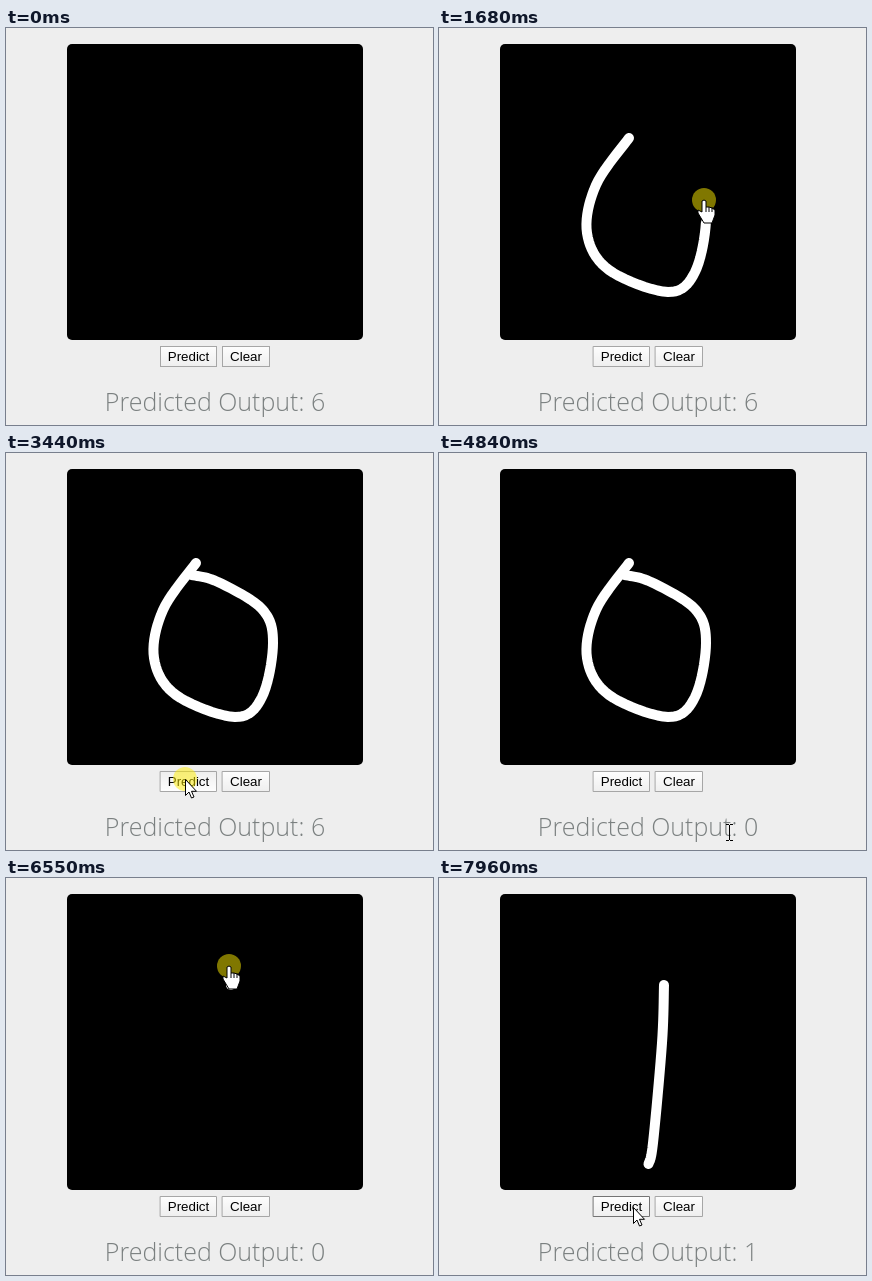
Animation of 427x397 px, one loop 8000 ms. Source, as an HTML page with a canvas:

```html
<!DOCTYPE html>
<html lang="en">
<head>
<meta charset="utf-8">
<title>Digit predictor</title>
<style>
  html, body { margin: 0; width: 100%; height: 100%; overflow: hidden; background: #eee; }
  canvas { display: block; }
</style>
</head>
<body>
<canvas id="stage" width="427" height="397"></canvas>
<script>
const ctx = document.getElementById('stage').getContext('2d');

// The screen updates in ticks; every time below is a tick number
const LOOP = 8000, FIRST_TICK = 183, TICK = 77.5;

const PAD = { x: 61, y: 16, w: 296, h: 296 };
const CAPTION = { x: 98, y: 358, w: 222, h: 31 };
const BUTTONS = [
  { label: 'Predict', x: 154, y: 318, w: 57, h: 21 },
  { label: 'Clear', x: 216, y: 318, w: 48, h: 21 }
];

const zero = {
  from: 10.8, to: 30, clear: 73,
  pace: k => Math.min(13.8 * k, 5.46 + 3.54 * k), // quick round, slow finish
  points: [[190, 110], [157, 157], [148, 205], [170, 242], [229, 264],
    [256, 244], [267, 190], [256, 156], [212, 129], [186, 122]]
};
const one = {
  from: 82, to: 88, clear: Infinity,
  pace: k => 3 * k,
  points: [[225, 107], [223, 165], [214, 265], [209.5, 286]]
};

const glide = (from, to, ...goal) => ({ from, to, goal });
const ENTRY = [344, 388];
const SCRIPT = [
  glide(0, 10, 190, 89),
  zero,
  glide(32, 42, 179, 326),
  glide(48, 55, 277, 376),
  glide(57, 65, 317, 386),
  glide(65, 70, 233, 329),
  glide(74, 80, 224, 86),
  one,
  glide(88, 89, 209, 281),
  glide(89, 95, 194, 329)
];
const PRESSES = [[11, 33], [42, 44], [71, 73], [82, 89], [97, 99]];

const HAND = [[-2, 1], [0, 0], [2, 1], [2, 7], [5, 7], [8, 8], [11, 10], [11, 15],
  [8, 23], [0, 23], [-6, 13], [-6, 10], [-2, 12]];
const ARROW = [[.5, .5], [.5, 16.5], [4, 13], [6.5, 19], [9, 18], [6.5, 12.3], [11.5, 12.3]];

const inside = (r, [x, y]) => x >= r.x && x < r.x + r.w && y >= r.y && y < r.y + r.h;
const ease = k => k * k * (3 - 2 * k);
const mix = (a, b, k) => a.map((v, i) => v + (b[i] - v) * k);
const progress = (s, n) => Math.min(1, (n - s.from) / (s.to - s.from));

// Catmull-Rom curve; u counts points from the start
function along(points, u) {
  const last = points.length - 1;
  const i = Math.min(Math.floor(u), last - 1);
  const k = Math.min(u, last) - i;
  const [a, b, c, d] = [-1, 0, 1, 2].map(j => points[Math.max(0, Math.min(last, i + j))]);
  return b.map((v, j) => v + k / 2 * (c[j] - a[j]
    + k * (2 * a[j] - 5 * v + 4 * c[j] - d[j] + k * (3 * (v - c[j]) + d[j] - a[j]))));
}

function pointerAt(n) {
  let at = ENTRY;
  for (const step of SCRIPT) {
    if (n < step.from) break;
    const k = progress(step, n);
    if (step.goal) {
      at = mix(at, step.goal, ease(k));
    } else {
      const [x, y] = along(step.points, step.pace(k) + .05);
      at = [x - 1.5, y - 21];
    }
  }
  return at.map(Math.round);
}

function trace(points) {
  ctx.beginPath();
  points.forEach(([x, y]) => ctx.lineTo(x, y));
}

function drawStroke(stroke, n) {
  if (n < stroke.from || n >= stroke.clear) return;
  const end = stroke.pace(progress(stroke, n));
  const line = [];
  for (let u = 0; u < end; u += .1) line.push(along(stroke.points, u));
  line.push(along(stroke.points, end));
  trace(line);
  ctx.strokeStyle = '#fff';
  ctx.lineWidth = 10;
  ctx.lineCap = ctx.lineJoin = 'round';
  ctx.stroke();
}

function drawButton({ label, x, y, w, h }, hover, pressed) {
  const fill = ctx.createLinearGradient(0, y, 0, y + h);
  const shades = ['#fefefe', '#eee'];
  fill.addColorStop(0, shades[+pressed]);
  fill.addColorStop(1, shades[+!pressed]);
  ctx.fillStyle = fill;
  ctx.fillRect(x, y, w, h);
  ctx.strokeStyle = hover && !pressed ? '#747474' : '#a6a6a6';
  ctx.lineWidth = 1;
  ctx.strokeRect(x + .5, y + .5, w - 1, h - 1);
  ctx.fillStyle = '#000';
  ctx.font = '13.333px "Liberation Sans", Arial, sans-serif';
  ctx.fillText(label, x + w / 2, 333);
}

function drawBeam() {
  ctx.fillStyle = '#000';
  ctx.fillRect(0, -7, 1, 15);
  for (const y of [-8, 8]) {
    ctx.fillRect(-3, y, 3, 1);
    ctx.fillRect(1, y, 3, 1);
  }
}

function drawShape(outline, fingers) {
  ctx.fillStyle = '#fff';
  ctx.strokeStyle = '#000';
  ctx.lineWidth = 1;
  ctx.lineCap = 'butt';
  ctx.lineJoin = 'round';
  trace(outline);
  ctx.closePath();
  ctx.fill();
  for (let i = 0; i < fingers; i++) {
    ctx.moveTo(2 + 3 * i, 7);
    ctx.lineTo(2 + 3 * i, 12);
  }
  ctx.stroke();
}

function drawPointer(at) {
  ctx.save();
  ctx.translate(...at);
  if (inside(CAPTION, at)) drawBeam();
  else if (inside(PAD, at)) drawShape(HAND, 3);
  else drawShape(ARROW, 0);
  ctx.restore();
}

function render(n) {
  const at = pointerAt(n);
  const visible = n >= 0;
  const pressed = PRESSES.some(([a, b]) => n >= a && n < b);

  ctx.fillStyle = '#eee';
  ctx.fillRect(0, 0, 427, 397);
  ctx.fillStyle = '#000';
  ctx.beginPath();
  ctx.roundRect(PAD.x, PAD.y, PAD.w, PAD.h, 5);
  ctx.fill();
  drawStroke(zero, n);
  drawStroke(one, n);

  ctx.textAlign = 'center';
  for (const button of BUTTONS) {
    const hover = visible && inside(button, at);
    drawButton(button, hover, hover && pressed);
  }

  const digit = n < 45 ? 6 : n < 100 ? 0 : 1;
  ctx.fillStyle = '#7b8080';
  ctx.font = '300 25px "Open Sans", sans-serif';
  ctx.fillText('Predicted Output: ' + digit, 209, 383);

  if (!visible) return;
  if (pressed) {
    ctx.fillStyle = 'rgba(255, 238, 0, .5)';
    ctx.beginPath();
    ctx.arc(...at, 12, 0, Math.PI * 2);
    ctx.fill();
  }
  drawPointer(at);
}

const begin = performance.now();
function frame() {
  const t = (performance.now() - begin) % LOOP;
  render(Math.floor((t - FIRST_TICK) / TICK));
  requestAnimationFrame(frame);
}
frame();
</script>
</body>
</html>
```
